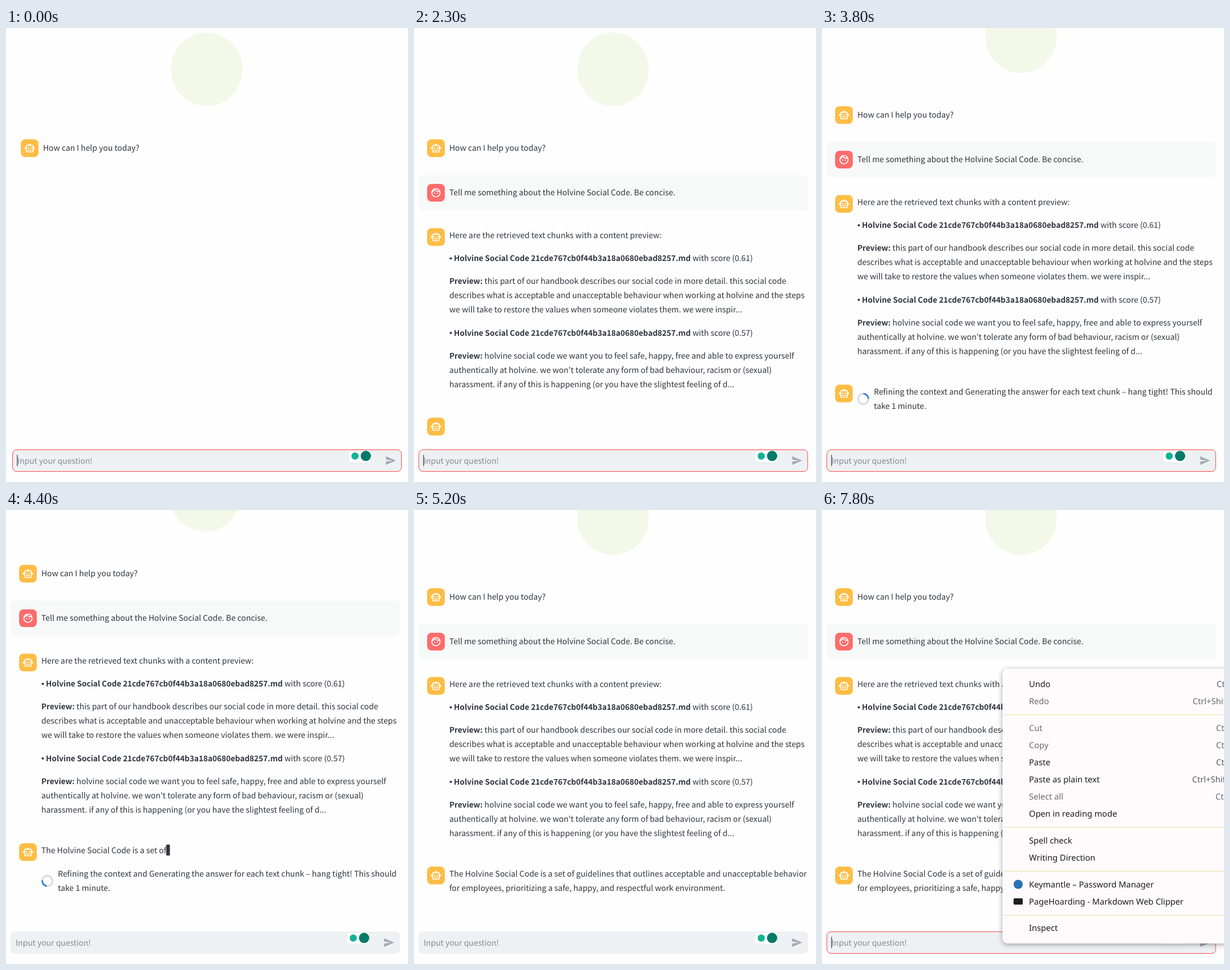
These frames come from a looping animation (705 px wide and 795 px high, 8000 ms). An HTML page:

```html
<!DOCTYPE html>
<html lang="en">
<head>
<meta charset="utf-8">
<title>Chat assistant</title>
<style>
  html, body { margin: 0; width: 100%; height: 100%; overflow: hidden; background: #fefefe; }
  svg { display: block; }
  text { white-space: pre; text-rendering: geometricPrecision; }
  .chat text, .field text {
    font: 13.9px "Noto Sans CJK JP", "Noto Sans CJK SC", "Noto Sans CJK", "Noto Sans", sans-serif;
    fill: #31333f;
  }
  .chat .b { font-weight: 700; font-size: 13.55px; }
  .chat .block { font: 16px "DejaVu Sans", sans-serif; }
  .field .hint { fill: #858992; }
  .menu text { font: 14.6px "Noto Sans", "Open Sans", sans-serif; fill: #1c1b1d; }
  .menu .off { fill: #6a696b; }
  .menu .key { fill: #5a595b; }
  .menu .card { fill: #fffbfd; filter: drop-shadow(0 2px 5px rgba(0, 0, 0, .35)); }
  .menu path { stroke: #e6e3a0; }
</style>
</head>
<body>
<svg width="705" height="795" viewBox="0 0 705 795">
  <defs>
    <g id="bot">
      <rect x="-15.5" y="-15.5" width="31" height="31" rx="7.5" fill="#ffbd45"/>
      <g transform="scale(.81) translate(-12 -12)" fill="#fff">
        <rect x="5" y="6" width="14" height="14" rx="1" fill="none" stroke="#fff" stroke-width="2"/>
        <path d="M9 5.5a3 3 0 0 1 6 0zM4 9a3 3 0 0 0 0 6zM20 9a3 3 0 0 1 0 6zM8 15h8v2H8z"/>
        <circle cx="9" cy="11.5" r="1.5"/>
        <circle cx="15" cy="11.5" r="1.5"/>
      </g>
    </g>
    <g id="face">
      <rect x="-15.5" y="-15.5" width="31" height="31" rx="7.5" fill="#ff6c6c"/>
      <g transform="scale(.81) translate(-12 -12)" fill="none" stroke="#fff" stroke-width="2">
        <circle cx="12" cy="12" r="9"/>
        <path d="M9.5 4.5C11.5 8 15 9.6 20 8.8M9 5C8 8 6 9.8 3.5 10.8"/>
        <g fill="#fff" stroke="none">
          <circle cx="9" cy="13" r="1.3"/>
          <circle cx="15" cy="13" r="1.3"/>
        </g>
      </g>
    </g>
    <g id="spinner" fill="none" stroke-width="3">
      <circle r="9" stroke="#dadbde"/>
      <path d="M-6.36-6.36A9 9 0 0 1 6.36-6.36" stroke="#3d8ad6"/>
    </g>
  </defs>

  <g id="page" class="chat">
    <ellipse cx="352" cy="72.3" rx="62.8" ry="64.4" fill="#f4f8e8"/>
    <use href="#bot" x="41.5" y="210.5"/>
    <text x="65" y="215">How can I help you today?</text>

    <g data-show="1100-8000">
      <rect x="11" y="257.5" width="683" height="62" rx="8" fill="#f7f9f9"/>
      <use href="#face" x="41.5" y="288.5"/>
      <text x="65" y="293">Tell me something about the Holvine Social Code. Be concise.</text>
      <use href="#bot" x="41.5" y="366"/>
    </g>

    <g data-show="1100-2000">
      <use class="spin" href="#spinner" data-at="75.5 375"/>
      <text x="94" y="368">Retrieving the text chunks – hang tight! This should take seconds.</text>
    </g>

    <g data-show="2000-8000">
      <text x="65" y="368">Here are the retrieved text chunks with a content preview:</text>
      <circle cx="67.5" cy="403.5" r="2" fill="#31333f"/>
      <text x="73" y="408"><tspan class="b">Holvine Social Code 21cde767cb0f44b3a18a0680ebad8257.md</tspan> with score (0.61)</text>
      <text x="65" y="448"><tspan class="b">Preview:</tspan> this part of our handbook describes our social code in more detail. this social code</text>
      <text x="65" y="473">describes what is acceptable and unacceptable behaviour when working at holvine and the steps</text>
      <text x="65" y="498">we will take to restore the values when someone violates them. we were inspir...</text>
      <circle cx="67.5" cy="534" r="2" fill="#31333f"/>
      <text x="73" y="538.5"><tspan class="b">Holvine Social Code 21cde767cb0f44b3a18a0680ebad8257.md</tspan> with score (0.57)</text>
      <text x="65" y="578.5"><tspan class="b">Preview:</tspan> holvine social code we want you to feel safe, happy, free and able to express yourself</text>
      <text x="65" y="603.5">authentically at holvine. we won't tolerate any form of bad behaviour, racism or (sexual)</text>
      <text x="65" y="628.5">harassment. if any of this is happening (or you have the slightest feeling of d...</text>
      <use href="#bot" x="41.5" y="698"/>
    </g>

    <text x="65" y="699.5"><tspan id="line1"></tspan><tspan id="block1" class="block"></tspan></text>
    <text x="65" y="724.5"><tspan id="line2"></tspan><tspan id="block2" class="block"></tspan></text>

    <g id="refining" data-show="2800-5200">
      <use class="spin" href="#spinner" data-at="75.5 707.5"/>
      <text x="94" y="699.5">Refining the context and Generating the answer for each text chunk – hang tight! This should</text>
      <text x="94" y="724.5">take 1 minute.</text>
    </g>
  </g>

  <g id="field" class="field">
    <rect x="11" y="738" width="683" height="39" rx="8" fill="#edf1f3"/>
    <rect id="focus" x="11.5" y="738.5" width="682" height="38" rx="7.5" fill="none" stroke="#ff4b4b"/>
    <text id="hint" class="hint" x="20" y="762.5">Input your question!</text>
    <text id="typed" x="20" y="762.5">Tell me something about the Holvine Social Code. Be concise.</text>
    <rect id="caret" y="747.5" width="1.2" height="19.5" fill="#31333f"/>
    <rect x="600.5" y="739.5" width="40" height="21.5" rx="4" fill="#fff" stroke="#dfe3e6" stroke-width=".8"/>
    <circle cx="612" cy="749.5" r="6.3" fill="#12b296"/>
    <circle cx="631" cy="749.3" r="9" fill="#047a68"/>
    <path id="send" transform="translate(675 757.5) scale(.83) translate(-12.5 -12)" d="M2 21 23 12 2 3v7l15 2-15 2z"/>
  </g>

  <g id="menu" class="menu">
    <rect class="card" x="316.5" y="278" width="420" height="481" rx="9"/>
    <rect id="hover" x="317" width="400" height="30" fill="#eeebed"/>
    <path d="M317 358.5h388M317 555.5h388M317 632.5h388M317 709.5h388"/>
    <g id="items"></g>
    <circle cx="344" cy="655.5" r="8" fill="#2a72b5"/>
    <rect x="336" y="680" width="16" height="11" rx="1.5" fill="#1f1e20"/>
  </g>
</svg>

<script>
const LOOP = 8000;
const $ = id => document.getElementById(id);
const clamp = v => Math.min(1, Math.max(0, v));
const within = (t, from, to) => t >= from && t < to;
const show = (el, on) => el.setAttribute('visibility', on ? 'visible' : 'hidden');
const move = (el, x, y) => el.setAttribute('transform', `translate(${x} ${y})`);

// label, centre y, shortcut, shortcut x, disabled
const menuItems = [
  ['Undo', 305, 'Ctrl+Z', 692],
  ['Redo', 335, 'Ctrl+Shift+Z', 650, true],
  ['Cut', 381.5, 'Ctrl+X', 691, true],
  ['Copy', 411.5, 'Ctrl+C', 691, true],
  ['Paste', 441.5, 'Ctrl+V', 691],
  ['Paste as plain text', 471.5, 'Ctrl+Shift+V', 649],
  ['Select all', 502, 'Ctrl+A', 690, true],
  ['Open in reading mode', 532],
  ['Spell check', 578.5],
  ['Writing Direction', 608.5],
  ['Keymantle – Password Manager', 655.5],
  ['PageHoarding - Markdown Web Clipper', 685.5],
  ['Inspect', 732],
];
$('items').innerHTML = menuItems.map(([label, y, key, keyX, off]) =>
  `<text x="363" y="${y + 5}" class="${off ? 'off' : ''}">${label}</text>` +
  (key ? `<text x="${keyX}" y="${y + 5}" class="${off ? 'off' : 'key'}">${key}</text>` : '')
).join('');

const tokens = text => text.match(/\s?\w+|[,.]/g);
const firstLine = tokens('The Holvine Social Code is a set of guidelines that outlines acceptable and unacceptable behavior');
const secondLine = tokens('for employees, prioritizing a safe, happy, and respectful work environment.');

const timed = [...document.querySelectorAll('[data-show]')].map(el => [el, ...el.dataset.show.split('-').map(Number)]);
const spinners = [...document.querySelectorAll('.spin')];

function drawAnswer(t) {
  const done = t >= 5200;
  const count = done ? Infinity : Math.max(0, Math.floor((t - 4130) / 33));
  const rest = Math.max(0, count - firstLine.length);
  $('line1').textContent = firstLine.slice(0, count).join('');
  $('line2').textContent = secondLine.slice(0, rest).join('');
  $('block1').textContent = !done && count && !rest ? '▌' : '';
  $('block2').textContent = !done && rest ? '▌' : '';
  move($('refining'), 0, rest ? 65 : count ? 41 : 0);
  return !done && count > 0;
}

function drawField(t) {
  const pasted = within(t, 800, 1100);
  const blinkOn = (t - 1100) % 1200 < 600;
  const caretOn = t < 500 || pasted || (within(t, 1100, 4200) && blinkOn) || t >= 6800;
  show($('typed'), pasted);
  show($('hint'), !pasted);
  show($('caret'), caretOn);
  $('caret').setAttribute('x', 19.2 + (pasted ? $('typed').getComputedTextLength() + 1 : 0));
  $('send').setAttribute('fill', pasted ? '#31333f' : '#a3a8b2');
  $('focus').setAttribute('opacity', t < 4200 ? 1 : clamp((t - 6740) / 200));
}

function drawMenu(t) {
  show($('menu'), t >= 7300);
  $('menu').setAttribute('opacity', t < 7400 ? 0.5 : 1);
  $('hover').setAttribute('y', t < 7700 ? 717 : 594);
  $('hover').setAttribute('opacity', within(t, 7600, 7800) ? 1 : 0);
}

function draw(t) {
  for (const [el, from, to] of timed) show(el, within(t, from, to));
  const angle = (t - 3800) * 360 / 1157 + 45;
  for (const el of spinners) el.setAttribute('transform', `translate(${el.dataset.at}) rotate(${angle})`);

  const streaming = drawAnswer(t);
  const scroll = t < 2800 ? 0 : streaming ? 99 : 58;
  const shift = t < 2000 ? 0 : -3; // the scrollbar narrows the page
  move($('page'), shift, -scroll);
  move($('field'), shift, 0);
  drawField(t);
  drawMenu(t);
}

const start = performance.now();
function tick() {
  draw((performance.now() - start) % LOOP);
  requestAnimationFrame(tick);
}
tick();
</script>
</body>
</html>
```
